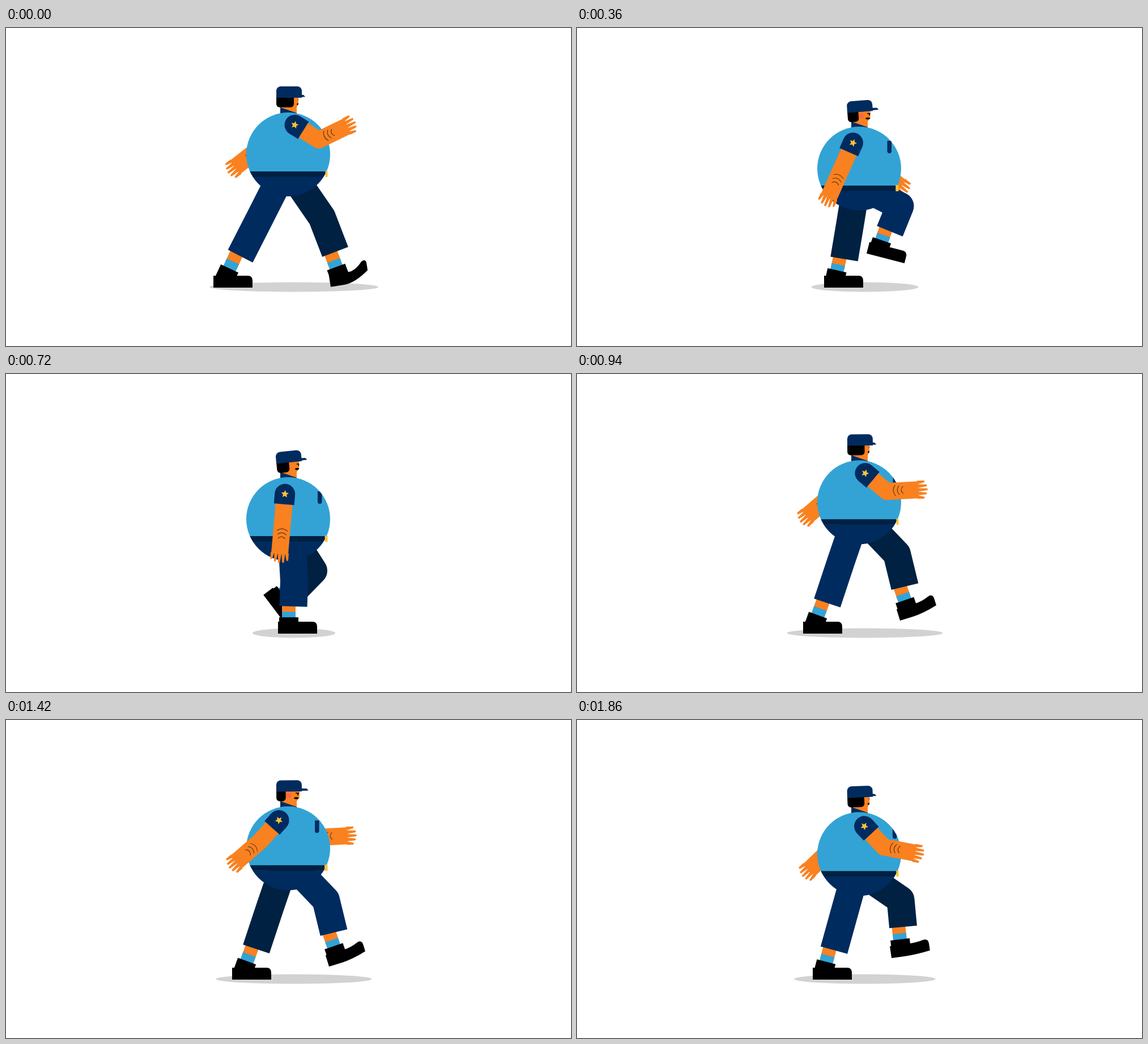
An HTML page with a canvas that plays this animation: 997x561 px, repeating every 1.9 s.

```html
<!DOCTYPE html>
<html lang="en">
<head>
<meta charset="utf-8">
<title>Walking officer</title>
<style>
  html, body { margin: 0; width: 100%; height: 100%; overflow: hidden; background: #fff; }
  canvas { display: block; }
</style>
</head>
<body>
<canvas id="stage" width="997" height="561"></canvas>
<script>
const c = document.getElementById('stage').getContext('2d');
const ORANGE = '#f98120', SKY = '#33a3d6', NAVY = '#002b5f', DARK = '#002141', GOLD = '#fdc33a', BLACK = '#000';
const LOOP = 1900, CYCLE = 32, HALF = CYCLE / 2, CX = 498;

// phase, hip x, knee x y, cuff x y, foot x y, foot angle, toe lift
const LEG = [
  [0, 490, 452, 327, 413.5, 402.5, 385, 445, 0, 0],
  [5, 491, 479, 352, 447, 390, 421.5, 413, 47, 0],
  [7, 503, 542.5, 347, 509, 381.5, 476, 397, 53, 0],
  [11, 497, 570, 314, 552, 358.5, 532.6, 390, 14.5, 0],
  [13, 496, 571, 317, 575.5, 365, 572, 404.5, -8, 4],
  [14, 505, 564.5, 317.5, 578.5, 375, 584.4, 417, -17, 7],
  [16, 501, 557.5, 334, 581, 395, 589.7, 441, -9, 19],
  [21, 505, 549, 348, 557.5, 404, 555, 445, 0, 0],
  [23, 504, 508.5, 365, 507, 410, 499, 445, 0, 0],
  [27, 493, 482, 345, 471.5, 407.5, 455, 445, 0, 0],
  [29, 492.5, 473, 335.5, 453.5, 406, 435, 445, 0, 0],
  [30, 491.6, 466, 330, 441.5, 404, 418, 445, 0, 0]
];
// phase, upper arm and forearm angles from straight down
const ARM = [
  [0, 58, 116], [5, 30, 33], [11, -24, -24], [13, -42, -46], [14, -42, -49],
  [16, -40, -52], [21, -33, -43], [23, -5, -5], [29, 43, 79], [30, 50, 93]
];
// half-cycle phase, body drop
const DROP = [[0, 0], [2, 4], [3, 12], [5, 25], [7, 33], [8, 34], [9, 33], [11, 25], [13, 13.5], [14, 3.3]];

const rad = deg => deg * Math.PI / 180;
const mod = (a, b) => ((a % b) + b) % b;
const turn = p => (1 - Math.cos(2 * Math.PI * p / CYCLE)) / 2;

// Monotone cubic through periodic keys
function sample(keys, phase, period) {
  const n = keys.length, p = mod(phase, period);
  const i = keys.findLastIndex(k => k[0] <= p);
  const time = k => keys[mod(k, n)][0] + period * Math.floor(k / n);
  return keys[0].slice(1).map((_, j) => {
    const val = k => keys[mod(k, n)][j + 1];
    const slope = k => (val(k + 1) - val(k)) / (time(k + 1) - time(k));
    const tangent = k => {
      const a = slope(k - 1), b = slope(k);
      return a * b <= 0 ? 0 : 2 * a * b / (a + b);
    };
    const h = time(i + 1) - time(i), u = (p - time(i)) / h, v = 1 - u;
    return val(i) * v * v * (1 + 2 * u) + val(i + 1) * u * u * (3 - 2 * u)
      + h * u * v * (tangent(i) * v - tangent(i + 1) * u);
  });
}

function line(color, width, ...pts) {
  c.strokeStyle = color;
  c.lineWidth = width;
  c.lineJoin = 'round';
  c.beginPath();
  pts.forEach(p => c.lineTo(p[0], p[1]));
  c.stroke();
}

function fill(color, draw) {
  c.fillStyle = color;
  c.beginPath();
  draw();
  c.fill();
}

const poly = (color, ...pts) => fill(color, () => pts.forEach(p => c.lineTo(p[0], p[1])));
const disc = (color, x, y, r) => fill(color, () => c.arc(x, y, r, 0, 7));
const box = (color, x, y, w, h, r = 0) => fill(color, () => c.roundRect(x, y, w, h, r));

function placed(x, y, angle, draw) {
  c.save();
  c.translate(x, y);
  c.rotate(angle);
  draw();
  c.restore();
}

function leg(phase, drop, color) {
  const [hx, kx, ky, ex, ey, fx, fy, angle, lift] = sample(LEG, phase, CYCLE);
  const len = Math.hypot(ex - kx, ey - ky);
  // The ankle sits behind the trouser axis
  const top = [ex - 8 * (ey - ky) / len, ey + 8 * (ex - kx) / len];
  const at = u => [fx + (top[0] - fx) * u, fy + (top[1] - fy) * u];
  line(ORANGE, 24, at(.6), at(1.15));
  line(SKY, 24, at(.4), at(.72));
  line(BLACK, 34, at(0), at(.45));
  placed(fx, fy, rad(angle), () => fill(BLACK, () => {
    c.moveTo(-19, 13);
    c.lineTo(-19, -8);
    c.lineTo(16, -8);
    c.quadraticCurveTo(28, -8, 42, -8 - lift * .8);
    c.quadraticCurveTo(50, -8 - lift, 50, 1 - lift);
    c.lineTo(50, 13 - lift);
    c.quadraticCurveTo(24, 13, 5, 13);
  }));
  line(color, 49, [hx, 252 + drop], [kx, ky], [ex, ey]);
}

function star(r) {
  fill(GOLD, () => {
    for (let i = 0; i < 10; i++) {
      const a = i * Math.PI / 5, s = i % 2 ? r * .46 : r;
      c.lineTo(s * Math.sin(a), -s * Math.cos(a));
    }
  });
}

function arm(phase, drop) {
  const [upper, fore] = sample(ARM, phase, CYCLE).map(rad);
  const t = turn(phase), sx = 509.5 - 29 * t, sy = 171 + 1.2 * drop + 2 * t;
  const ex = sx + 50 * Math.sin(upper), ey = sy + 50 * Math.cos(upper);
  const wx = ex + 56 * Math.sin(fore), wy = ey + 56 * Math.cos(fore);
  line(ORANGE, 30, [sx, sy], [ex, ey], [wx, wy]);
  placed(ex, ey, -fore, () => {
    [10, 14, 16, 15, 11].forEach((len, i) => {
      const x = (i - 2) * 6.4;
      poly(ORANGE, [x - 3.2, 54], [x + 3.2, 54], [x * 1.12 + 1.6, 56 + len], [x * 1.12 - 1.6, 56 + len]);
    });
    c.strokeStyle = '#5c3413';
    c.lineWidth = 1.1;
    for (let i = 0; i < 3; i++) {
      const y = 15 + 7 * i, w = 9.5 - 1.5 * i;
      c.beginPath();
      c.moveTo(1 - w, y);
      c.quadraticCurveTo(1, y - 7, 1 + w, y);
      c.stroke();
    }
  });
  placed(sx, sy, -upper, () => {
    disc(NAVY, 0, 0, 18);
    box(NAVY, -18, 0, 36, 18);
    star(7);
  });
}

function head(t, drop) {
  const hair = 508 - 15 * t, edge = 516 + 2 * t;
  c.save();
  c.translate(0, drop);
  c.save();
  c.beginPath();
  [[484, 115], [edge, 115], [edge, 134], [513, 140], [513, 153], [484, 153]].forEach(p => c.lineTo(p[0], p[1]));
  c.clip();
  box(ORANGE, 480, 110, 45, 50);
  c.globalAlpha = Math.max(0, Math.min(1, (t - .6) / .2));
  disc('#f8674e', 515 - 16.5 * t, 130, 4.5);
  c.globalAlpha = 1;
  const eye = 515.5 - 4.5 * t;
  box(BLACK, eye, 125, 6, 1.6);
  box(BLACK, eye + 3, 126, 1.8, 3.5);
  fill(BLACK, () => c.ellipse(517 - 5 * t, 134.5, 4, 1.8, 0, 0, 7));
  c.restore();
  poly(NAVY, [484, 140], [513, 150], [513, 154], [484, 154]);
  placed(499, 122, rad(-6 * drop / 34), () => {
    c.translate(-499, -122);
    box(BLACK, 477, 118, hair - 477, 22, [0, 0, 6, 6]);
    box(NAVY, 477, 103, 45, 20, [8, 8, 0, 0]);
    const tip = 528 + 6 * t;
    poly(NAVY, [518, 117.5], [tip - 3, 118], [tip, 121.5], [518, 122]);
  });
  c.restore();
}

function body(t, drop) {
  const y = 223 + drop;
  c.save();
  c.beginPath();
  c.arc(CX, y, 74, 0, 7);
  c.clip();
  box(SKY, 420, y - 76, 156, 110);
  box(NAVY, 558 - 13.5 * t, y - 49, 7.5, 22, [0, 0, 3.7, 3.7]);
  box(NAVY, 420, y + 39, 156, 40);
  box(DARK, 420, y + 30, 156, 9.5);
  c.restore();
  box(GOLD, 563.5 - 1.5 * t, y + 29, 4 + 1.5 * t, 11, 1);
}

// Steps alternate 40 and 20 ms after an opening hold of 60 ms
function stepAt(ms) {
  if (ms < 60) return 0;
  const s = ms - 60;
  return 1 + 2 * Math.floor(s / 60) + (s % 60 >= 40 ? 1 : 0);
}

function draw(ms) {
  const phase = stepAt(ms) % CYCLE, t = turn(phase);
  const [drop] = sample(DROP, phase, HALF);
  c.fillStyle = '#fff';
  c.fillRect(0, 0, 997, 561);
  const reach = 70 + 39.5 * (1 + Math.cos(2 * Math.PI * phase / HALF));
  fill('#d2d2d2', () => c.ellipse(508, 457, reach, 8.5, 0, 0, 7));
  arm(phase + HALF, drop);
  leg(phase + HALF, drop, DARK);
  leg(phase, drop, NAVY);
  head(t, drop);
  body(t, drop);
  arm(phase, drop);
}

const start = performance.now();
function tick() {
  draw((performance.now() - start) % LOOP);
  requestAnimationFrame(tick);
}
tick();
</script>
</body>
</html>
```
